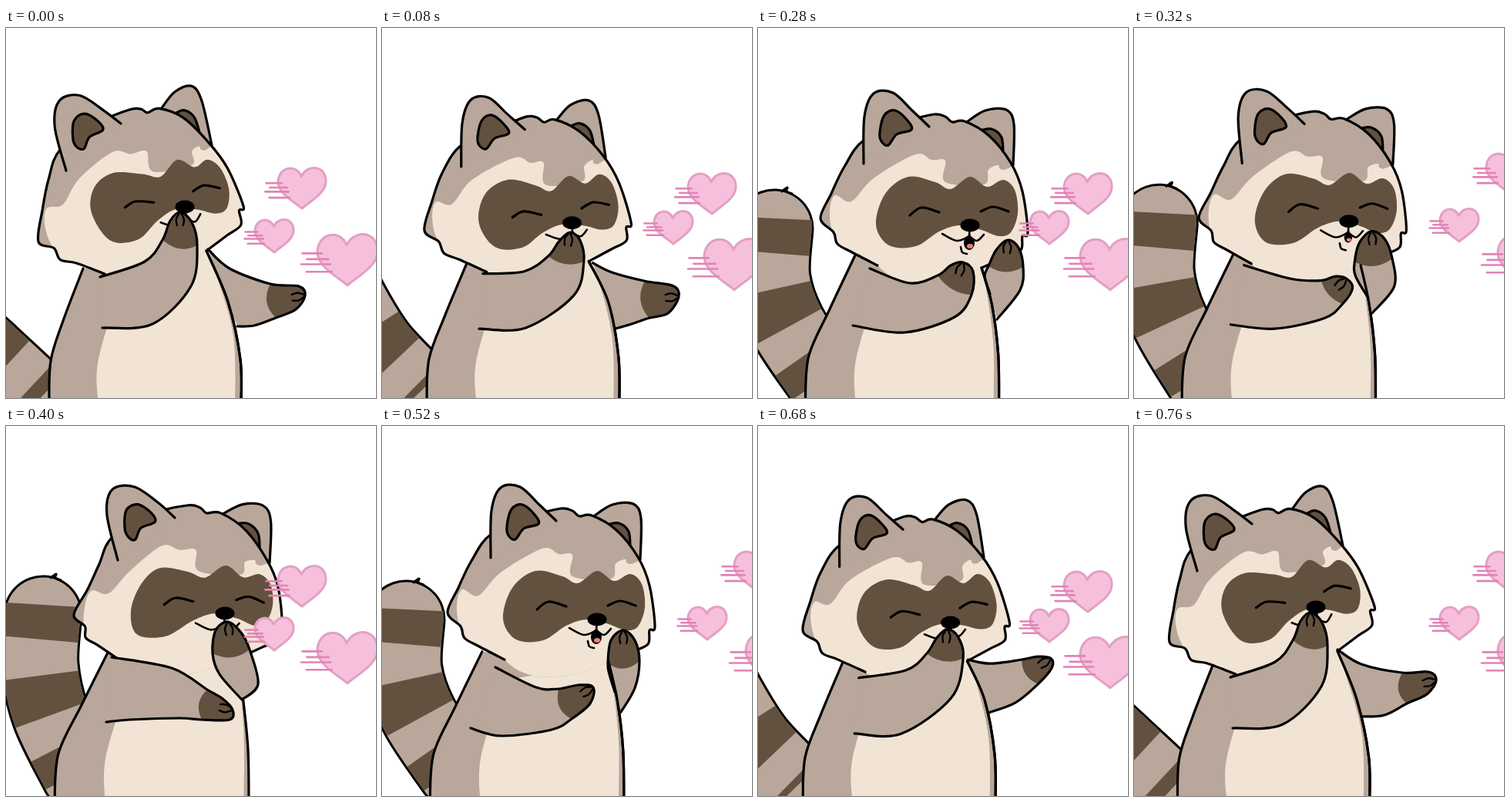
Write an HTML page with a canvas that moves like this. It is 480 by 480 pixels and loops after 800 ms.

```html
<!DOCTYPE html>
<html lang="en">
<head>
<meta charset="utf-8">
<title>Raccoon blowing kisses</title>
<style>
html, body { margin: 0; height: 100%; overflow: hidden; background: #fff; }
canvas { display: block; width: 480px; height: 480px; }
</style>
</head>
<body>
<canvas id="stage" width="480" height="480"></canvas>
<script>
const ctx = document.getElementById('stage').getContext('2d');
const FUR = '#b8a79a', CREAM = '#f1e4d5', DARK = '#635140', INK = '#000';
const LOOP = 800, STEP = 40;
const TIMES = [0, 160, 280, 400, 520, 600, 760];

const points = text => text.trim().split(/\s+/).map(p => p.split(',').map(Number));
const shift = (list, [dx, dy]) => list.map(([x, y]) => [x + dx, y + dy]);

// Poses that are not written out are shifted copies of earlier ones.
function part(text, late) {
  const keys = text.trim().split('\n').map(points);
  for (let i = keys.length; i < 7; i++) keys.push(shift(keys[6 - i], late[i - 4]));
  return keys;
}

// The head is drawn once and bent to follow these landmarks: cheek corner, chin,
// left ear (tip, base, end), right ear (tip, end), nose, right cheek, mask, eye, jaw, brow, tuft.
const landmarks = part(`
42,277 128,319 82,87 78,185 149,124 237,74 267,152 232,232 308,231 111,240 168,225 260,289 222,171 160,106
69,250 145,314 168,89 127,176 219,138 293,109 314,183 262,270 339,272 141,263 200,248 278,315 262,209 215,122
81,247 155,308 163,81 137,176 222,128 318,104 331,178 275,256 350,265 153,255 212,233 290,311 275,193 228,112
88,245 145,302 152,77 145,174 219,119 330,101 342,178 284,243 358,256 162,240 220,223 300,302 285,181 235,103`,
  [[4, -5], [2, 0], [4, 3]]);
const REST = landmarks[2], JAW = REST[11];

const skull = points('155,308 122,291 103,280 98,265 81,247 95,215 112,180 138,145 195,121 228,112 243,115 252,122 268,121 300,140 328,175 343,212 350,265 343,270 341,288 320,298 290,311');
const chin = [195, 352];
const cheeks = points('100,275 93,240 100,217 121,225 150,195 204,164 225,171 243,172 243,200 293,203 299,184 312,178 317,184 360,190 370,370 130,350');
const mask = points('153,255 165,215 195,193 230,200 250,209 275,193 297,206 318,197 333,210 337,240 328,265 312,270 290,262 262,256 235,264 205,283 170,282');
const leftEar = points('137,176 138,115 150,85 175,84 200,107 222,128');
const leftInner = points('158,135 164,113 178,107 194,120 199,132 180,138 169,152 160,147');
const rightEar = points('272,121 295,107 322,106 332,125 331,178');
const rightInner = points('288,133 303,131 316,142 318,166');
const leftEye = points('197,243 212,233 235,239');
const rightEye = points('289,238 305,232 325,238');
const mouth = points('239,267 258,276 274,270 274,270 284,276 293,268');

const farArm = part(`
262,287 290,312 343,332 380,335 388,347 376,365 350,376 322,386 300,387
286,324 305,321 335,321 368,326 376,338 364,361 344,366 322,377 306,389
301,345 294,322 299,309 309,288 324,275 338,285 344,310 340,340 310,378
306,355 277,322 268,295 272,265 288,254 305,268 316,290 327,335 306,355
302,345 295,322 293,308 297,278 313,265 328,278 334,305 328,340 310,371
283,319 305,310 330,292 338,283 360,276 374,284 366,313 340,345 302,370
264,290 295,309 348,320 382,319 392,330 380,348 354,360 325,375 296,377`);
const nearArm = part(`
122,323 180,303 203,275 213,250 226,239 241,252 248,282 240,335 190,384 125,389
140,315 190,328 228,316 245,303 260,291 272,298 275,325 257,360 185,394 127,391
145,312 197,331 233,321 250,308 266,304 279,316 277,346 255,375 190,395 123,386
137,300 215,314 261,342 280,353 294,368 290,381 254,381 225,379 160,381 130,384
147,313 200,339 229,341 255,336 274,339 270,360 246,380 220,394 155,402 115,392
137,325 200,328 230,315 247,301 262,291 273,300 275,325 252,370 175,409 121,403`,
  [, , [3, 3]]);
const tail = part(`
-102,349 -68,381 -16,429 42,483
-14,288 -13,332 10,400 60,460
21,260 18,325 38,385 85,455
48,245 44,310 58,375 95,450`, [[10, -9], [0, 0], [4, -9]]);

// How far the body leans to the right, and how far the mouth is open.
const mood = part('0,0\n.58,0\n.76,1\n1,0\n.88,1\n.58,0\n.06,0');
const bodyLeft = ['100,312 74,380 58,432 56,490', '134,290 98,362 68,425 63,490'].map(points);
const bodyRight = ['305,490 304,430 288,355', '315,490 314,420 308,358'].map(points);
const bellyLeft = ['150,330 119,435 122,500', '160,330 129,432 130,500'].map(points);
const bellyRight = ['297,500 295,400 272,318', '308,500 309,420 306,360'].map(points);
const mix = ([a, b], w) => a.map((p, i) => p.map((v, k) => v + (b[i][k] - v) * w));

// Smooth cyclic interpolation between the key poses.
function poseAt(keys, time) {
  const n = TIMES.length;
  const when = i => TIMES[(i + n) % n] + LOOP * Math.floor(i / n);
  let i = n - 1;
  while (TIMES[i] > time) i--;
  const span = when(i + 1) - when(i), u = (time - when(i)) / span;
  const key = k => keys[(k + n) % n];
  return key(i).map((p, j) => p.map((from, axis) => {
    const value = k => key(k)[j][axis];
    const slope = k => (value(k + 1) - value(k - 1)) / (when(k + 1) - when(k - 1)) * span;
    const d = value(i + 1) - from, a = slope(i), b = slope(i + 1);
    return from + u * (a + u * (3 * d - 2 * a - b + u * (a + b - 2 * d)));
  }));
}

// Thin-plate spline that carries every point of `from` onto its partner in `to`.
function makeWarp(from, to) {
  const kernel = ([x, y], [u, v]) => {
    const d = (x - u) ** 2 + (y - v) ** 2;
    return d && d * Math.log(d);
  };
  const basis = p => [...from.map(q => kernel(p, q)), 1, ...p];
  const rows = from.map((p, i) => [...basis(p), ...to[i]]);
  for (let k = 0; k < 3; k++) rows.push([...from.map(p => [1, ...p][k]), 0, 0, 0, 0, 0]);
  const n = rows.length;
  for (let c = 0; c < n; c++) {
    let best = c;
    for (let r = c; r < n; r++) if (Math.abs(rows[r][c]) > Math.abs(rows[best][c])) best = r;
    [rows[c], rows[best]] = [rows[best], rows[c]];
    rows[c] = rows[c].map(v => v / rows[c][c]);
    for (let r = 0; r < n; r++) {
      const factor = rows[r][c];
      if (r !== c) rows[r] = rows[r].map((v, k) => v - factor * rows[c][k]);
    }
  }
  return p => [0, 1].map(k => basis(p).reduce((sum, b, i) => sum + b * rows[i][n + k], 0));
}

function addCurve(path, list, closed) {
  const n = list.length;
  const at = i => list[closed ? (i + n) % n : Math.max(0, Math.min(n - 1, i))];
  path.lineTo(...list[0]);
  for (let i = 0; i < n - !closed; i++) {
    const [a, b, c, d] = [at(i - 1), at(i), at(i + 1), at(i + 2)];
    path.bezierCurveTo(b[0] + (c[0] - a[0]) / 6, b[1] + (c[1] - a[1]) / 6,
      c[0] - (d[0] - b[0]) / 6, c[1] - (d[1] - b[1]) / 6, ...c);
  }
  return path;
}
const curve = (list, closed) => addCurve(new Path2D(), list, closed);

function fill(path, color) {
  ctx.fillStyle = color;
  ctx.fill(path);
}
function stroke(path, width = 3.2, color = INK) {
  ctx.lineWidth = width;
  ctx.strokeStyle = color;
  ctx.stroke(path);
}
function shape(path, color) {
  fill(path, color);
  stroke(path);
}
function oval(x, y, rx, ry, color) {
  const path = new Path2D();
  path.ellipse(x, y, rx, ry, 0, 0, 7);
  fill(path, color);
}

function drawTail(spine) {
  const [tip, next] = spine, path = curve(spine);
  stroke(path, 103);
  stroke(path, 97, FUR);
  const start = tip.map((v, k) => v + (v - next[k]) * 0.2);
  ctx.lineCap = 'butt';
  ctx.setLineDash([45, 47, 53, 42, 60, 60]);
  stroke(curve([start, ...spine]), 97, DARK);
  ctx.setLineDash([]);
  ctx.lineCap = 'round';
  stroke(curve(shift([[10, -48], [17, -53], [16, -48], [23, -45]], tip)), 3);
}

function drawLimb(arm, first) {
  const path = curve(arm), hand = arm.slice(first, first + 5);
  const [a, , tip, , b] = hand;
  const wrist = a.map((v, k) => (v + b[k]) / 2 * 1.4 - tip[k] * 0.4);
  const paw = curve(hand);
  paw.quadraticCurveTo(...wrist, ...a);
  fill(path, FUR);
  fill(paw, DARK);
  stroke(path);
  const dx = wrist[0] - tip[0], dy = wrist[1] - tip[1], size = Math.hypot(dx, dy);
  for (const side of [-5, 5]) {
    const along = (d, s) => [tip[0] + (dx * d - dy * s) / size, tip[1] + (dy * d + dx * s) / size];
    stroke(curve([along(2, side / 3), along(9, side), along(17, side * 0.8)]), 2.4);
  }
}

function drawHead(warp, open) {
  const bent = (list, closed) => curve(list.map(warp), closed);
  const outline = bent(skull), face = new Path2D(outline);
  face.quadraticCurveTo(...warp(chin), ...warp(skull[0]));

  const back = bent(rightEar);
  fill(back, FUR);
  shape(bent(rightInner), DARK);
  stroke(back);

  fill(face, FUR);
  ctx.save();
  ctx.clip(face);
  fill(bent(cheeks, true), CREAM);
  fill(bent(mask, true), DARK);
  ctx.restore();
  stroke(outline);

  shape(bent(leftEar), FUR);
  shape(bent(leftInner, true), DARK);
  stroke(bent(leftEye));
  stroke(bent(rightEye));

  const nose = warp(REST[7]), [x, y] = warp(mouth[2]);
  if (open > 0.2) {
    oval(x, y + 9 * open, 7 * open, 9 * open, INK);
    oval(x + 1, y + 13 * open, 4 * open, 3 * open, '#ee7f78');
    if (open > 0.6) stroke(curve(shift([[-11, 14], [-9, 21], [-3, 23]], [x, y])), 2.6);
  }
  stroke(bent(mouth), 2.6);
  stroke(curve([nose, [x, y]]), 2.6);
  oval(...nose, 12.5, 8.5, INK);
}

const heartShape = new Path2D('M0 .84C-.35.55-1 .2-1-.25C-1-.9-.25-1.05-.03-.5C.25-1.05 1-.95 1-.3C1 .2.4.5 0 .84Z');
const speedLines = new Path2D('M-1.5-.22H-.85M-1.35-.03H-.62M-1.54.14H-.56M-1.37.39H-.52');
const heartSizes = [31, 25, 39];
const heartSpots = ['384,208 348,270 443,301', '428,215 378,259 457,307', '488,189 422,256 511,302'].map(points);
const heartOrder = [0, 1, 1, 2, 2];

function drawHearts(step) {
  heartSpots[heartOrder[step % 5]].forEach(([x, y], i) => {
    const size = heartSizes[i];
    ctx.save();
    ctx.translate(x, y);
    ctx.scale(size, size);
    fill(heartShape, '#f6c0dc');
    stroke(heartShape, 3 / size, '#e2a0c6');
    stroke(speedLines, 2.6 / size, '#e283b6');
    ctx.restore();
  });
}

function draw(now) {
  const step = Math.floor(now / STEP) % (LOOP / STEP), time = step * STEP;
  const pose = keys => poseAt(keys, time);
  const [[lean, open]] = pose(mood);
  const warp = makeWarp(REST, pose(landmarks)), jaw = warp(JAW);
  ctx.fillStyle = '#fff';
  ctx.fillRect(0, 0, 480, 480);
  ctx.lineCap = ctx.lineJoin = 'round';

  drawTail(pose(tail));
  const left = curve(mix(bodyLeft, lean)), rightSide = [...mix(bodyRight, lean), jaw];
  const right = curve(rightSide);
  fill(addCurve(new Path2D(left), rightSide), FUR);
  fill(addCurve(curve(mix(bellyLeft, lean)), [...mix(bellyRight, lean), jaw]), CREAM);
  stroke(left);
  stroke(right);
  drawHead(warp, open);
  drawLimb(pose(farArm), 2);
  // The far arm crosses in front of the body only at the right end of the sway.
  if (Math.abs(time - 400) > STEP) stroke(right);
  drawLimb(pose(nearArm), 2);
  drawHearts(step);
}

const begin = performance.now();
function tick() {
  draw(performance.now() - begin);
  requestAnimationFrame(tick);
}
tick();
</script>
</body>
</html>
```
